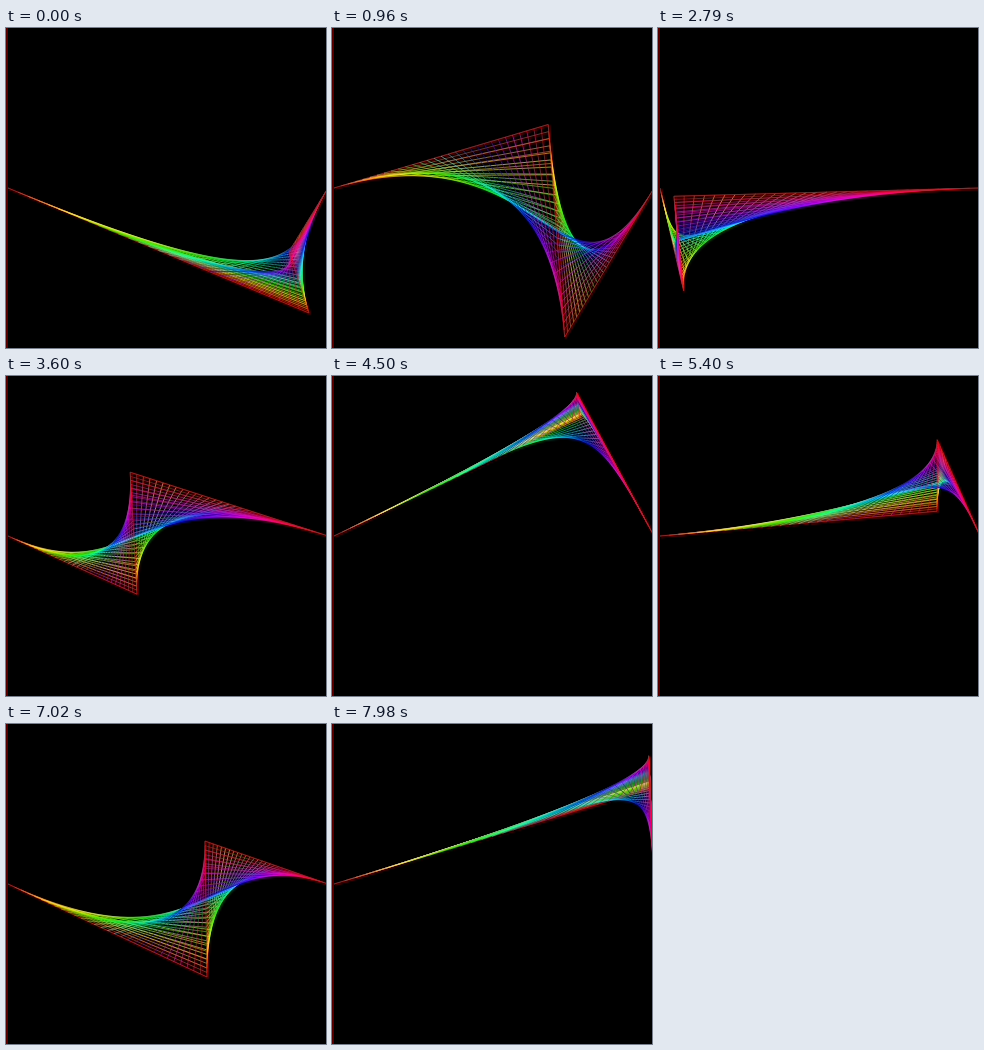
Recreate the animation shown at these times as an HTML page with a canvas. Size 320 by 320 pixels, loop 8 s.

```html
<!DOCTYPE html>
<html lang="en">
<head>
<meta charset="utf-8">
<title>Bézier strings</title>
<style>
  html, body { margin: 0; width: 100%; height: 100%; overflow: hidden; background: #000; }
  canvas { display: block; width: 320px; height: 320px; }
</style>
</head>
<body>
<canvas id="stage" width="320" height="320"></canvas>
<script>
const LOOP = 8000, STEP = 30, TURN = 217, LINES = 30;
const LEFT = 2, SIZE = 320, HALF = SIZE / 2;
const start = { x: LEFT, y: 160 };
const end = { x: LEFT + SIZE, y: 160 };

const ctx = document.getElementById('stage').getContext('2d');
const sharp = layer(SIZE), small = layer(HALF), soft = layer(SIZE);

function layer(size) {
  const canvas = document.createElement('canvas');
  canvas.width = canvas.height = size;
  return canvas.getContext('2d', { willReadFrequently: true });
}

// Constant speed between two walls.
function bounce(pos, speed, step) {
  const span = 2 * SIZE;
  const p = (((pos + speed * step) % span) + span) % span;
  return p > SIZE ? span - p : p;
}

function mix(a, b, t) {
  return { x: a.x + (b.x - a.x) * t, y: a.y + (b.y - a.y) * t };
}

function line(a, b) {
  sharp.beginPath();
  sharp.moveTo(a.x, a.y);
  sharp.lineTo(b.x, b.y);
  sharp.stroke();
}

function drawStrings(step) {
  const c1 = { x: LEFT + bounce(301, 3.9, step), y: bounce(285, -5.89, step) };
  const c2 = { x: LEFT + bounce(281, 4.01, step), y: bounce(223.7, 2.667, step) };

  sharp.globalAlpha = 1;
  sharp.fillStyle = '#000';
  sharp.fillRect(0, 0, SIZE, SIZE);
  sharp.globalAlpha = 0.65;
  for (let i = 0; i <= LINES; i++) {
    const t = i / LINES;
    const q0 = mix(start, c1, t), q1 = mix(c1, c2, t), q2 = mix(c2, end, t);
    sharp.strokeStyle = `hsl(${360 * t}, 100%, 50%)`;
    line(q0, q1);
    line(q1, q2);
    line(mix(q0, q1, t), mix(q1, q2, t));
  }
}

const luma = (d, i) => 0.299 * d[i] + 0.587 * d[i + 1] + 0.114 * d[i + 2];

// Sharp brightness with colour at half resolution, so thin lines look pale.
function softenColour() {
  small.drawImage(sharp.canvas, 0, 0, HALF, HALF);
  soft.fillRect(0, 0, SIZE, SIZE);
  soft.drawImage(small.canvas, 1, 1, SIZE, SIZE);
  const image = sharp.getImageData(0, 0, SIZE, SIZE);
  const out = image.data;
  const tint = soft.getImageData(0, 0, SIZE, SIZE).data;
  for (let i = 0; i < out.length; i += 4) {
    const shift = luma(out, i) - luma(tint, i);
    for (let c = 0; c < 3; c++) out[i + c] = tint[i + c] + shift;
  }
  ctx.putImageData(image, 0, 0);
}

function draw(ms) {
  const tick = Math.floor((ms % LOOP) / STEP);
  // The motion runs backwards after the turning point.
  drawStrings(tick <= TURN ? tick : 2 * TURN - tick);
  softenColour();
  ctx.fillStyle = '#500000';
  ctx.fillRect(0, 0, 2, SIZE);
}

const began = performance.now();
function frame() {
  draw(performance.now() - began);
  requestAnimationFrame(frame);
}
frame();
</script>
</body>
</html>
```
